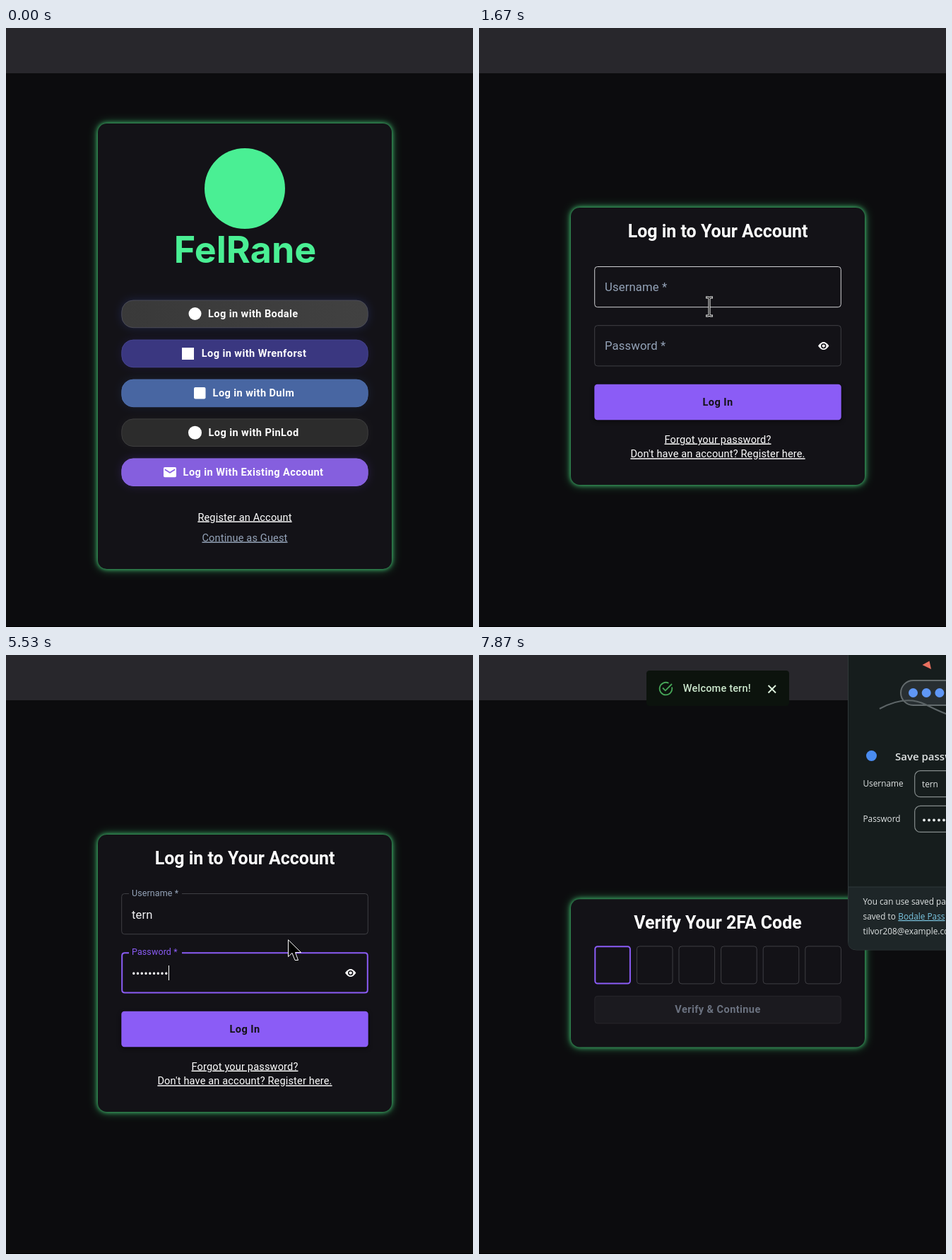
These frames come from a looping animation (661x847 px, 8 s). An HTML page:

```html
<!DOCTYPE html>
<html lang="en">
<head>
<title>Login flow</title>
<style>
html, body { margin: 0; width: 100%; height: 100%; overflow: hidden; background: #0c0c0e; }
svg { display: block; width: 661px; height: 847px; font-family: Roboto, sans-serif; }
.btn { font-size: 14.56px; font-weight: 700; letter-spacing: .416px; }
.link { font-size: 14.56px; letter-spacing: .156px; text-decoration: underline; }
.title { font-size: 24.96px; font-weight: 700; fill: #fff; }
.input { font-size: 16.64px; letter-spacing: .156px; }
.mid { text-anchor: middle; }
.pop { font-family: "Open Sans", sans-serif; font-size: 11.8px; fill: #dfe3e3; }
</style>
</head>
<body>
<svg id="stage" viewBox="0 0 661 847" xmlns="http://www.w3.org/2000/svg"></svg>
<script>
const LOOP = 8000, MID = 338, PURPLE = '#8b5cf6', MUTED = '#94a3b8', GREEN = '#4aef94';
const USER = 'tern';
const USER_KEYS = [2870, 2930, 3130, 3200];
const PASS_KEYS = [3730, 3870, 4200, 4270, 4800, 5000, 5130, 5400, 5530, 5670];
const FOCUS_USER = 1870, FOCUS_PASS = 3470, LOGIN = 1000, VERIFY = 6000;

// Pointer stops: time, x, y
const PATH = [
  [130, 664, 850], [860, 404, 628], [1200, 404, 628], [1670, 326, 394],
  [1870, 338, 374], [2130, 399, 402], [7070, 399, 402], [7780, 690, 170]
];

const clamp = v => Math.max(0, Math.min(1, v));
const ease = v => (1 - Math.cos(Math.PI * clamp(v))) / 2;
const $ = id => document.getElementById(id);
const set = (id, attrs) => { for (const k in attrs) $(id).setAttribute(k, attrs[k]); };
const show = (id, on) => set(id, { display: on ? 'inline' : 'none' });
const text = (x, y, cls, str, rest = '') => `<text x="${x}" y="${y}" class="${cls}" ${rest}>${str}</text>`;
const box = (x, y, w, h, r, rest) => `<rect x="${x}" y="${y}" width="${w}" height="${h}" rx="${r}" ${rest}/>`;
const dot = (x, y, r, fill) => `<circle cx="${x}" cy="${y}" r="${r}" fill="${fill}"/>`;
const bar = (id, x, y, h) => box(x, y, 1, h, 0, `id="${id}" fill="#fff"`);

function card(y, h) {
  const glow = (blur, a) => box(130, y, 416, h, 12.5, `fill="#4ade80" opacity="${a}" filter="url(#${blur})"`);
  return glow('wide', .55) + glow('near', .85) + box(130, y, 416, h, 12.5, 'fill="#131217"');
}

function option(y, fill, edge, glow, textX, label, icon) {
  return box(163.3, y, 349.4, 39.5, 16.6, `fill="${glow}" opacity=".28" filter="url(#wide)"`) +
    box(163.8, y + .5, 348.4, 38.6, 16.2, `fill="${fill}" stroke="${edge}"`) +
    icon + text(textX, y + 24.5, 'btn', label, 'fill="#fff"');
}

function welcome() {
  const mail = `<rect x="223" y="621" width="18" height="14.3" rx="1.8" fill="#fff"/>
    <path d="M224.8 624.2L232 628.8 239.2 624.2" fill="none" stroke="#8b62e6" stroke-width="1.7"/>`;
  return card(135, 630) + dot(MID, 227, 57, GREEN) +
    text(MID + .5, 331.5, 'mid', 'FelRane', `font-family="Inter, sans-serif" font-size="52" font-weight="700" fill="${GREEN}"`) +
    option(384.6, 'url(#grey)', '#4a4b57', '#3c4fb0', 286, 'Log in with Bodale', dot(267.5, 404, 9, '#fff')) +
    option(440.6, '#3a3780', '#45438f', '#302c78', 276.8, 'Log in with Wrenforst', box(249, 452, 17, 17, 0, 'fill="#fff"')) +
    option(496.6, '#4866a2', '#4d6dab', '#2c4270', 292.6, 'Log in with Dulm', box(266, 508, 16.5, 16.5, 2, 'fill="#fff"')) +
    option(552.4, '#2c2c2c', '#3d3d3e', '#333', 286.5, 'Log in with PinLod', dot(267.5, 572.3, 9.5, '#fff')) +
    option(608.4, '#855fde', '#8b66e2', '#5a3cb0', 250.6, '', '') +
    box(163.8, 608.9, 348.4, 38.6, 16.2, 'id="hover" fill="#a97fff" stroke="#ece4ff"') +
    `<circle id="ripple" cx="404" cy="628" fill="#fff" opacity=".12"/>` +
    mail + text(250.6, 632.9, 'btn', 'Log in With Existing Account', 'fill="#fff"') +
    text(MID, 696.5, 'link mid', 'Register an Account', 'fill="#fff"') +
    text(MID, 725.5, 'link mid', 'Continue as Guest', `fill="${MUTED}"`);
}

const field = (id, label) => `<path id="${id}Edge" fill="none"/>
  <text id="${id}Label" class="input">${label}&#160;*</text>
  <text id="${id}Text" class="input" x="178" fill="#f1f1f3"></text>`;

function login() {
  return card(254, 392) + text(MID, 296, 'title mid', 'Log in to Your Account') +
    field('user', 'Username') + field('pass', 'Password') + bar('caret', 178, 356, 21) +
    `<path d="M480 449.6Q487.7 438.6 495.4 449.6 487.7 460.6 480 449.6Z" fill="#fff"/>` +
    dot(487.7, 449.6, 3.7, '#131217') + dot(487.7, 449.6, 2.1, '#fff') +
    box(163.3, 506, 349.4, 50, 4.2, 'fill="#000" opacity=".6" filter="url(#near)"') +
    box(163.3, 503.8, 349.4, 50.4, 4.2, `id="submit" fill="${PURPLE}"`) +
    text(MID, 534, 'btn mid', 'Log In', 'fill="#131217"') +
    text(MID, 586.5, 'link mid', 'Forgot your password?', 'fill="#fff"') +
    text(MID, 607.3, 'link mid', "Don't have an account? Register here.", 'fill="#fff"');
}

function verify() {
  let cells = '';
  for (let i = 0; i < 6; i++) {
    const x = 163.3 + i * 59.6;
    cells += i ? box(x + .5, 411.9, 50.6, 53, 4, 'fill="none" stroke="#3f3f44"')
               : box(x + 1, 412.3, 49.6, 52.2, 3.5, `fill="none" stroke="${PURPLE}" stroke-width="2"`);
  }
  return card(345.3, 209.2) + text(MID, 387, 'title mid', 'Verify Your 2FA Code') + cells +
    bar('codeCaret', 189, 423, 30) +
    box(163.8, 482.3, 348.4, 38.6, 4, 'fill="#1b1a1f" stroke="#27262b"') +
    text(MID, 506.3, 'btn mid', 'Verify &amp; Continue', 'fill="#6b7280"');
}

function toast() {
  return box(237, 22, 202, 50, 4.2, 'fill="#0c130d"') +
    `<g fill="none" stroke="#46a758" stroke-width="1.8">
      <path d="M273 45.5A8.8 8.8 0 1 1 268.5 39.8"/><path d="M260 46.5L263.8 50.3 273 41"/></g>` +
    text(288.8, 52.2, '', `Welcome ${USER}!`, 'font-size="14.56" font-weight="500" letter-spacing=".156" fill="#cce8cd"') +
    `<path d="M409.5 43L420 53.5M420 43L409.5 53.5" stroke="#dcf0dc" stroke-width="1.9"/>`;
}

function popup() {
  let dots = '';
  for (let i = 0; i < 3; i++) dots += dot(614.5 + i * 18.7, 53.5, 6.5, '#5f97f6');
  for (let i = 0; i < 5; i++) dots += dot(630 + i * 7, 233.5, 1.9, '#e6eaea');
  const input = y => box(616.7, y, 80, 37, 8, 'fill="none" stroke="#858c8c" stroke-width="1.2"');
  return `<path d="M522.5 -2V405Q522.5 417 534.5 417H670V-2Z" fill="#161d1d" stroke="#30383a"/>
    <path d="M523 328H670V416.5H534.5Q523 416.5 523 405Z" fill="#1e2628"/>
    <path d="M523 328H670" stroke="#2f383a"/>
    <path d="M627.5 14L637.5 8.5 640 20Z" fill="#e8705f"/>` +
    box(597, 36, 100, 35, 17.5, 'fill="#282f32" stroke="#636b6d" stroke-width="2"') +
    `<path d="M567 76Q604 56 632 70T668 85" fill="none" stroke="#5d6567" stroke-width="2"/>` +
    dots + dot(555.5, 142.5, 7.5, '#4a8cf0') +
    text(589, 149, 'pop', 'Save password?', 'style="font-size:15px;font-weight:600"') +
    text(543.5, 186, 'pop', 'Username') + text(543.5, 236, 'pop', 'Password') +
    input(163.7) + input(213.4) + text(627, 186.5, 'pop', USER) +
    text(543.5, 353, 'pop', 'You can use saved passwords') +
    text(543.5, 374, 'pop', 'saved to') +
    text(593.3, 374, 'pop', 'Bodale Pass', 'style="fill:#7cc8e4;text-decoration:underline"') +
    text(543.5, 395, 'pop', 'tilvor208@example.com');
}

const blur = (id, s) => `<filter id="${id}" filterUnits="userSpaceOnUse" x="80" y="80" width="520" height="740"
  color-interpolation-filters="sRGB"><feGaussianBlur stdDeviation="${s}"/></filter>`;

$('stage').innerHTML = `<defs>${blur('near', 3)}${blur('wide', 7)}
    <linearGradient id="grey"><stop stop-color="#393939"/><stop offset="1" stop-color="#414141"/></linearGradient>
  </defs>
  <rect width="661" height="847" fill="#0c0c0e"/><rect y="846" width="661" height="1" fill="#000"/>
  <rect width="661" height="64" fill="#28272c"/>
  <g id="welcome">${welcome()}</g><g id="login">${login()}</g><g id="verify">${verify()}</g>
  <g id="toast">${toast()}</g><g id="popup">${popup()}</g>
  <g id="pointer">
    <path id="arrow" d="M.5 .8V24.6L6 19.4 10 29.5H14.5L10.5 18.6H18.6Z" fill="#000" stroke="#fff"/>
    <path id="hand" d="M-1.7 1.6Q0 -.8 1.7 1.6V8.5Q4 7.2 5 9.3 7 8.4 7.6 10.2 9.8 10 9.8 12.2V16Q9.6 19 7.8 22.5H-1.2Q-3 18.5 -6 14.6 -6.6 12 -4.2 12.2L-1.7 14.4Z
      M1.7 8.5V12M5 9.5V12.5M7.6 10.5V13" fill="#fff" stroke="#000" stroke-width="1.1"/>
    <g id="beam" fill="none"><path d="M-5 -13H-1.5L0 -12 1.5 -13H5M0 -12V12M-5 13H-1.5L0 12 1.5 13H5" stroke="#fff" stroke-width="3"/>
      <path d="M-4.4 -13H-1.5L0 -12 1.5 -13H4.4M0 -12V12M-4.4 13H-1.5L0 12 1.5 13H4.4" stroke="#000" stroke-width="1.2"/></g>
  </g>`;

function pointerAt(t) {
  let i = 0;
  while (i < PATH.length - 2 && t >= PATH[i + 1][0]) i++;
  const [t0, x0, y0] = PATH[i], [t1, x1, y1] = PATH[i + 1], k = ease((t - t0) / (t1 - t0));
  return { x: x0 + (x1 - x0) * k, y: y0 + (y1 - y0) * k };
}

const typed = (keys, t) => keys.filter(k => k <= t).length;
const blink = age => age >= 0 && age % 1062 < 530;

// Outlined field: the label rises by k and opens a gap in the top edge.
function drawField(id, y, k, focused, hover, value) {
  const i = focused ? 1 : .5, l = 163.2 + i, r = 512.8 - i, top = y + i, low = y + 58.2 - i, c = 4;
  const gap = k > 0 ? 174 + 75 * clamp(k * 1.6) : 174;
  set(id + 'Edge', {
    d: `M${gap} ${top}H${r - c}Q${r} ${top} ${r} ${top + c}V${low - c}Q${r} ${low} ${r - c} ${low}` +
       `H${l + c}Q${l} ${low} ${l} ${low - c}V${top + c}Q${l} ${top} ${l + c} ${top}H174`,
    stroke: focused ? PURPLE : hover ? '#d0d0d3' : '#3f3f44', 'stroke-width': focused ? 2 : 1
  });
  set(id + 'Label', {
    transform: `translate(178 ${y + 34.8 - 31 * k}) scale(${1 - .25 * k})`,
    fill: focused ? PURPLE : MUTED
  });
  set(id + 'Text', { y: y + 35.8 });
  $(id + 'Text').textContent = value;
}

function draw(t) {
  const p = pointerAt(t);
  const inX = p.x > 163 && p.x < 513;
  const over = (a, b) => inX && p.y >= a && p.y <= b;
  const onLogin = t >= LOGIN && t < VERIFY;
  show('welcome', t < LOGIN);
  show('login', onLogin);
  show('verify', t >= VERIFY);

  const hoverStart = 700;
  set('hover', { opacity: ease((t - hoverStart) / 210) });
  set('ripple', { r: 12 * clamp((t - 890) / 60) });

  if (onLogin) {
    const userOn = t >= FOCUS_USER && t < FOCUS_PASS, passOn = t >= FOCUS_PASS;
    const nUser = typed(USER_KEYS, t), nPass = typed(PASS_KEYS, t);
    drawField('user', 337, ease((t - FOCUS_USER) / 200), userOn, over(337, 395), USER.slice(0, nUser));
    drawField('pass', 420.2, ease((t - FOCUS_PASS) / 200), passOn, over(420, 478), '\u2022'.repeat(nPass));
    set('submit', { fill: over(504, 554) ? '#9468fa' : PURPLE });
    const last = passOn ? PASS_KEYS[nPass - 1] || FOCUS_PASS : USER_KEYS[nUser - 1] || FOCUS_USER;
    const width = (passOn ? nPass : nUser) ? $(passOn ? 'passText' : 'userText').getComputedTextLength() : 0;
    set('caret', { x: Math.round(178 + width), y: passOn ? 439 : 356 });
    show('caret', blink(t - last));
  }
  show('codeCaret', blink(t - VERIFY));

  const k = ease((t - 6040) / 220), s = .75 + .25 * k;
  set('toast', { opacity: k, transform: `translate(338 47) scale(${s}) translate(-338 -47)` });
  set('popup', { opacity: clamp((t - 6100) / 150) });

  const hand = t < LOGIN ? over(608, 648)
    : onLogin && (over(504, 554) || over(574, 610));
  const beam = onLogin && (over(337, 395) || over(420, 478));
  show('pointer', t >= 130);
  show('hand', hand);
  show('beam', beam);
  show('arrow', !hand && !beam);
  set('pointer', { transform: `translate(${Math.round(p.x)} ${Math.round(p.y)})` });
}

const start = performance.now();
function tick(now) {
  draw(Math.max(0, now - start) % LOOP);
  requestAnimationFrame(tick);
}
draw(0);
requestAnimationFrame(tick);
</script>
</body>
</html>
```
